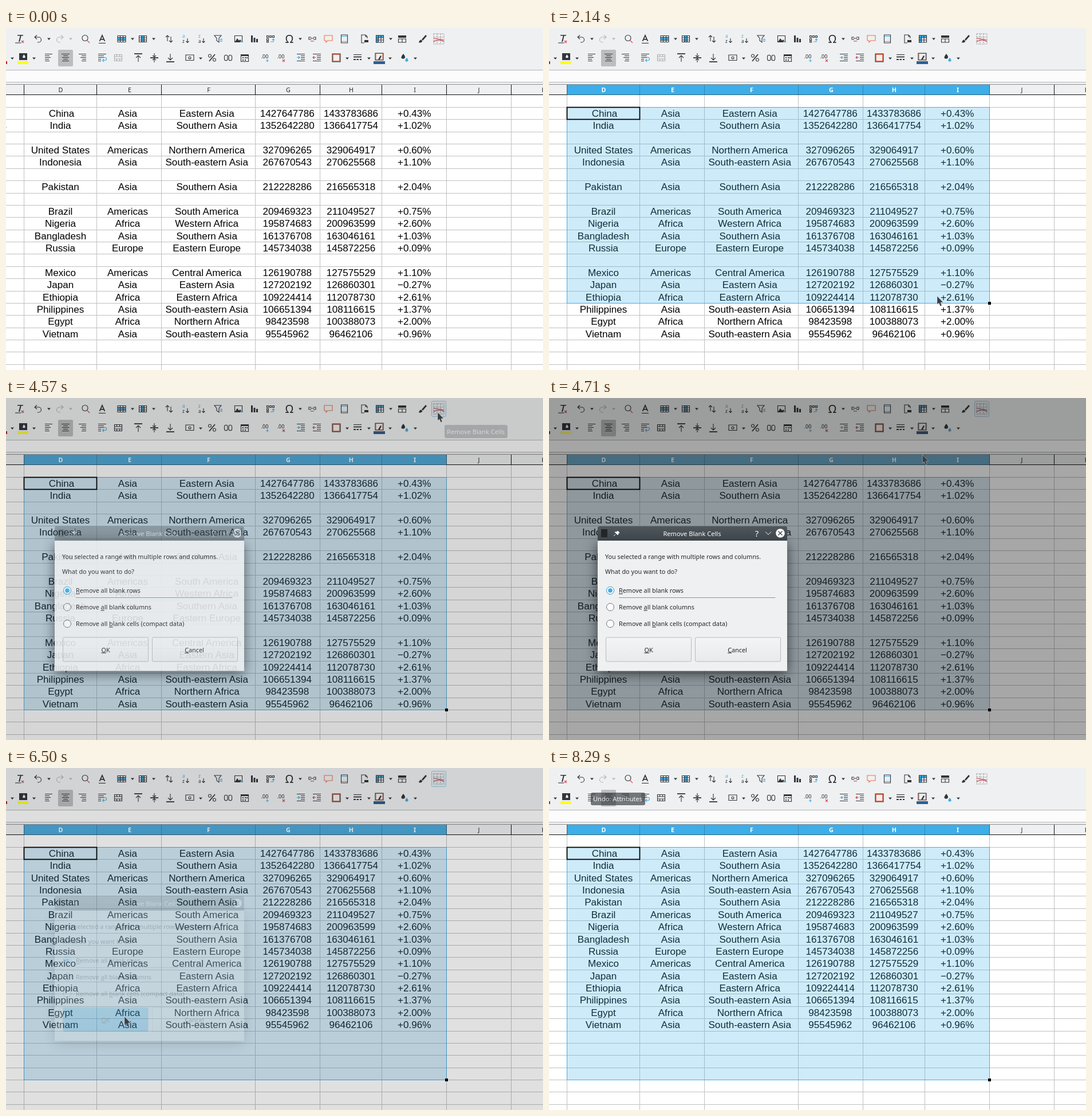
Write an HTML page that moves like this. It is 938 px wide and 597 px high and loops after 8.37 s.

```html
<!DOCTYPE html>
<html lang="en">
<head>
<meta charset="utf-8">
<title>Remove blank rows</title>
<style>
  html, body { margin: 0; width: 100%; height: 100%; overflow: hidden; background: #fff; }
  svg { display: block; }
  text { font-family: "Noto Sans", sans-serif; font-size: 10.8px; fill: #232629; white-space: pre; }
  .cell { font-family: "Liberation Sans", Arial, sans-serif; font-size: 17.1px; fill: #000; text-anchor: middle; }
  .mid { text-anchor: middle; }
  .on { font-weight: bold; fill: #fff; }
  .tip text { font-size: 11.1px; fill: #fcfcfc; }
  .tip rect { fill: #31363b; }
  .icons path { fill: none; stroke: #31363b; stroke-width: 1.1; }
  .icons .f { fill: #31363b; stroke: none; }
  .icons .b { stroke: #3daee9; }
  .icons .B { fill: #3daee9; stroke: none; }
  .icons .r { stroke: #da4453; }
  .icons .o { stroke: #f2704d; }
  .icons .g { stroke: #b4b6b8; }
  .icons .G { fill: #b4b6b8; stroke: none; }
  .icons .d { stroke: #85888a; stroke-dasharray: 2 1.5; stroke-width: .9; }
  .icons .w { stroke-width: 1.8; }
  #body { filter: drop-shadow(0 5px 11px rgba(0, 0, 0, .6)); }
  u, .u { text-decoration: underline; }
</style>
</head>
<body>
<script>
const LOOP = 8370, TICK = 500 / 7;
const colX = [31.5, 158.5, 271.5, 435.5, 548.5, 656.5, 769.5, 882.5];
const rowY = k => Math.round(138 + 21.37 * k) + .5;
const path = (d, cls = '') => `<path class="${cls}" d="${d}"/>`;
const rect = (x, y, w, h, attrs = '') => `<rect x="${x}" y="${y}" width="${w}" height="${h}" ${attrs}/>`;
const text = (x, y, s, cls = '', attrs = '') => `<text x="${x}" y="${y}" class="${cls}" ${attrs}>${s}</text>`;
const lines = (d, color) => `<path d="${d}" fill="none" stroke="${color}"/>`;

const people = `China|Asia|Eastern Asia|1427647786|1433783686|+0.43%
India|Asia|Southern Asia|1352642280|1366417754|+1.02%
United States|Americas|Northern America|327096265|329064917|+0.60%
Indonesia|Asia|South-eastern Asia|267670543|270625568|+1.10%
Pakistan|Asia|Southern Asia|212228286|216565318|+2.04%
Brazil|Americas|South America|209469323|211049527|+0.75%
Nigeria|Africa|Western Africa|195874683|200963599|+2.60%
Bangladesh|Asia|Southern Asia|161376708|163046161|+1.03%
Russia|Europe|Eastern Europe|145734038|145872256|+0.09%
Mexico|Americas|Central America|126190788|127575529|+1.10%
Japan|Asia|Eastern Asia|127202192|126860301|−0.27%
Ethiopia|Africa|Eastern Africa|109224414|112078730|+2.61%
Philippines|Asia|South-eastern Asia|106651394|108116615|+1.37%
Egypt|Africa|Northern Africa|98423598|100388073|+2.00%
Vietnam|Asia|South-eastern Asia|95545962|96462106|+0.96%`.split('\n').map(r => r.split('|'));
const blankBefore = [2, 4, 5, 9];
const slot = i => i + blankBefore.filter(b => b <= i).length;
const textX = [95, 212.5, 350.7, 491.3, 602.5, 713.3];
const headX = [95.5, 216, 354, 493, 603, 714, 826, 939];

// Each line: centre x, y, then "class:path" parts drawn around that centre.
const iconSpec = `24 19|f:M-4 -7H6V-5.5H2.7L0 5H-2L.7 -5.5H-4Z|:M-8 7H2|r:M3 3l4 4M7 3l-4 4
56 19|:M-2 -6.5l-4 3.5l4 3.5M-6 -3H1a4.2 4.2 0 0 1 0 9H-1
94 19|g:M2 -6.5l4 3.5l-4 3.5M6 -3H-1a4.2 4.2 0 0 0 0 9H1
139 19|:M-6 -1.5a5 5 0 1 0 10 0a5 5 0 1 0 -10 0|r:M2.5 2.5L7 7
168 19|w:M-4.5 4L0 -6L4.5 4M-3 .8H3|:M-6 7.5H6
202 19|B:M-7 -2.5h14v5h-14Z|:M-7 -5.5H7V5.5H-7ZM-2.5 -5.5V5.5M2.5 -5.5V5.5M-7 -2.5H7M-7 2.5H7
239 19|B:M-2.5 -6h5v12h-5Z|:M-6.5 -5.5H6.5V5.5H-6.5ZM-2.5 -5.5V5.5M2.5 -5.5V5.5M-6.5 -2H6.5M-6.5 2H6.5
285 19|:M-3 4V-6m-3 3l3 -3l3 3M3 -4V6m-3 -3l3 3l3 -3
314 19|:M3 -1V6.500m-2.500 -2.500l2.500 2.500l2.500 -2.500
342 19|:M3 -1V6.500m-2.500 -2.500l2.500 2.500l2.500 -2.500
371 19|:M-7 -6H5L1 -1V6L-3 3V-1Z|B:M3 0h4v1.500h-4ZM3 3h4v1.500h-4Z
406 19|:M-6.500 -5.500H6.500V5.500H-6.500Z|f:M-6 5l4 -6l3 4l2 -2l3 4Z|B:M3 4h5v2h-5Z
434 19|f:M-6 -6h3v12h-3ZM-1.500 -2h3v8h-3ZM3 0h3v6h-3Z
462 19|:M-6.500 -5.500h3v3h-3ZM-1.500 -5.500h3v3h-3ZM3.500 -5.500h3v3h-3ZM-6.500 -.500h3v3h-3ZM-6.500 4h3v2h-3Z|b:M0 5H5V0m-2 2l2 -2l2 2
535 19|:M-2 -3H-6V1H-2M2 -3H6V1H2M-3 -1H3|r:M-3 4l6 0
563 19|o:M-7 -6H7V3H-1L-4 6V3H-7Z
591 19|:M-5.500 -7H5.500V7H-5.500Z|b:M-5 -4.500H5M-5 4.500H5
626 19|:M0 7H-5V-7H2L5 -4V-1M2 -7V-4H5|f:M0 2h7v4h-7Z
653 19|B:M-7 -6.500h14v4h-14ZM-7 -2h4v9h-4Z|:M-6.500 -6H6.500V6H-6.500ZM-2.500 -6V6M2 -6V6M-6.500 -2H6.500M-6.500 2H6.500
692 19|f:M-7 -6h14v4h-14Z|:M-6.500 0H6.500V6H-6.500ZM0 0V6
727 19|f:M6 -7L8 -5L1 3L-1 1ZM-2 1.500L.500 4Q-1 7 -6 6.500Q-5 2 -2 1.500Z
756 19|d:M-9 -9H9V9H-9ZM-9 -3H9M-9 3H9M-3 -9V9M3 -9V9|r:M-9 5Q0 -1 9 5M-9 -1L9 2
30 52|f:M-7 -8h14v12h-14Z
75 52|:M-7 -6.500H6M-7 -3.500H1M-7 -.500H3M-7 2.500H0M-7 5.500H1
104 52|:M-7 -6.500H7M-4 -3.500H4M-6 -.500H6M-4 2.500H4M-6 5.500H6
133 52|:M-6 -6.500H7M-1 -3.500H7M-3 -.500H7M0 2.500H7M-1 5.500H7
168 52|:M-7 -6.500H7M-7 -3.500H3M-7 -.500H3M-7 2.500H-2M-7 5.500H-2|b:M3 -.500H5a2.500 2.500 0 0 1 0 5H1m2 -2.500l-2.500 2.500l2.500 2.500
231 52|w:M-7 -7H7|:M0 7V-4m-4 4l4 -4l4 4
259 52|w:M-7 0H7|:M0 -8V-2m-3 -2l3 2.500l3 -2.500M0 8V2m-3 2l3 -2.500l3 2.500
287 52|w:M-7 7H7|:M0 -7V4m-4 -4l4 4l4 -4
321 52|:M-7 -5H7V4.500H-7ZM-2 0a2 2 0 1 0 4 0a2 2 0 1 0 -4 0
360 52|w:M5 -6L-5 6|:M-6.500 -3.500a2.500 2.500 0 1 0 5 0a2.500 2.500 0 1 0 -5 0M1.500 3.500a2.500 2.500 0 1 0 5 0a2.500 2.500 0 1 0 -5 0
388 52|:M-6.500 -2a2.800 2.800 0 0 1 5.600 0V2a2.800 2.800 0 0 1 -5.600 0ZM1 -2a2.800 2.800 0 0 1 5.600 0V2a2.800 2.800 0 0 1 -5.600 0Z
417 52|:M-6.500 -5.500H6.500V6.500H-6.500Z|f:M-6 -6H6V-3H-6ZM-4 -1h2v2h-2ZM0 -1h2v2h-2ZM3 -1h2v2h-2ZM-4 3h2v2h-2ZM0 3h2v2h-2Z
452 52|b:M2 5H7M4.500 2.500V7.500
480 52|r:M3 3l4 4M7 3l-4 4
515 52|:M-7 -6.500H7M0 -3.500H7M0 -.500H7M0 2.500H7M-7 5.500H7|b:M-7 -.500H-2m-2.500 -2.500l2.500 2.500l-2.500 2.500
543 52|:M-7 -6.500H7M0 -3.500H7M0 -.500H7M0 2.500H7M-7 5.500H7|r:M-2 -.500H-7m2.500 -2.500l-2.500 2.500l2.500 2.500
577 52|o w:M-6 -6H6V6H-6Z|:M-7 -7H7V7H-7Z
614 52|:M-7 -5.500H7|w:M-7 -1.500H7|w:M-7 3H-3M-1.500 3H2M4 3H7
652 52|o:M-6 -7.500H6V3.500H-6Z|f:M-2 3l4 -7l2 1l-3 6Z|:M-7 -8H7V4H-7Z
697 52|f:M-3 -7Q2 -1 -1 1Q-3 2.500 -6 1Q-8 -1 -3 -7Z|B:M3 0Q7 4 5 6Q3 7.500 1 6Q-1 4 3 0Z`;
const drops = [[75, 19], [221, 19], [258, 19], [514, 19], [672, 19], [11, 53], [49, 53],
  [340, 53], [596, 53], [634, 53], [671, 53], [715, 53]];
const at = (x, y, inner, extra = '') => `<g transform="translate(${x} ${y})" ${extra}>${inner}</g>`;

function toolbar() {
  const icons = iconSpec.split('\n').map(line => {
    const [pos, ...parts] = line.split('|'), [x, y] = pos.split(' ');
    return at(x, y, parts.map(p => { const [c, d] = p.split(':'); return path(d, c); }).join(''));
  }).join('');
  const arrow = 'M-3 -1.5H3L0 2Z', merge = 'M-6.5 -5.5H6.5V5.5H-6.5ZM-6.5 -2H6.5M-6.5 2H6.5M-2.5 -5.5V-2M2.5 -5.5V-2M-2.5 2V5.5M2.5 2V5.5';
  const az = (x, a, b) => text(x - 6, 17, a, '', 'style="font-size:8px;fill:#3daee9"') + text(x - 6, 26, b, '', 'style="font-size:8px"');
  return rect(0, 0, 938, 98, 'fill="#eff0f1"') + rect(91, 38, 26, 29, 'rx="2" fill="#bbbdbe"') +
    '<g class="icons">' + icons + drops.map(([x, y]) => at(x, y, path(arrow, 'f'))).join('') +
    at(113, 19, path(arrow, 'G')) + at(196, 52, path(merge), 'id="merge"') + '</g>' +
    az(314, 'a', 'z') + az(342, 'z', 'a') +
    text(495, 26, 'Ω', 'mid', 'style="font-size:19px"') +
    text(452, 53, '.00', 'mid', 'style="font-size:9px"') + text(480, 53, '.00', 'mid', 'style="font-size:9px"') +
    '<path d="M31 46q4 4 2 6q-3 1 -4 -1z" fill="#eff0f1"/>' +
    rect(20, 58, 19, 5, 'fill="#ff0"') + rect(642, 58, 20, 5, 'fill="#2a6099"') + rect(0, 58, 2, 5, 'fill="#c9211e"') +
    rect(743.5, 5.5, 25, 27, 'id="hover" rx="2" fill="#3daee9" fill-opacity=".06" stroke="#8ccbec"') +
    rect(0, 74, 938, 20, 'fill="#fcfcfc"') + lines('M0 73.5H938M0 94.5H938', '#b3b5b6');
}

function sheet() {
  let grid = '', seps = 'M0 116.5H938';
  for (const x of colX) { grid += `M${x} 117V597`; seps += `M${x} 99V116`; }
  for (let k = 0; k < 22; k++) grid += `M0 ${rowY(k)}H938`;
  const heads = headX.map((x, i) => {
    const w = (colX[i + 1] || 938) - colX[i];
    return (i < 6 ? rect(colX[i], 99, w, 17.5, 'class="lit" fill="#3daee9"') : '') + text(x, 112, 'DEFGHIJK'[i], 'mid head');
  }).join('');
  const rows = people.map((r, i) => '<g class="row">' +
    r.map((s, c) => text(textX[c] + (i + c ? 0 : 2), 155, s, 'cell')).join('') + '</g>').join('');
  return rect(0, 98, 938, 18, 'fill="#eff0f1"') + lines('M0 98.5H938', '#8d8f90') + lines(seps, '#111') + heads +
    lines(grid, '#c0c0c0') + rows +
    rect(31.5, 138.5, 1, 1, 'id="range" fill="#3daee9" fill-opacity=".25" stroke="#3daee9"') +
    rect(31.5, 138.5, 127, 21, 'id="active" fill="none" stroke="#000" stroke-width="1.8"') +
    rect(0, 0, 5, 5, 'id="handle"');
}

function dialog() {
  const u = s => s.replace(/_(.)/, '<tspan class="u">$1</tspan>');
  const radio = (y, s) => `<circle cx="107" cy="${y}" r="6.5" fill="#fcfcfc" stroke="#6f7376"/>` + text(122, y + 4.3, u(s));
  const button = (x, id) => rect(x, 418, 149, 42, `id="${id}" rx="2" fill="url(#btn)" stroke="#b9bbbd"`);
  return rect(85, 249, 331, 227.5, 'id="body" fill="#eff0f1"') +
    '<g id="bar"><path d="M85 249V227q0 -3 3 -3H413q3 0 3 3V249Z" fill="url(#title)"/>' +
    rect(91, 229, 11, 14, 'fill="#232629"') +
    '<path d="M113 241l3 -3M115 234l5 5l1 -2l2 -2l-3 -3l-2 2z" fill="#fcfcfc" stroke="#fcfcfc"/>' +
    text(250, 240.5, 'Remove Blank Cells', 'mid', 'style="font-size:11.1px;fill:#fcfcfc"') +
    text(363, 241.5, '?', 'mid', 'style="font-size:15px;fill:#fcfcfc"') +
    lines('M378 233.5l5 5l5 -5', '#fcfcfc') + '<circle cx="404" cy="236" r="7.8" fill="#fcfcfc"/>' +
    '<path d="M400.500 232.500l7 7m0 -7l-7 7" stroke="#3b4248" stroke-width="1.3"/></g>' +
    text(98, 280.5, 'You selected a range with multiple rows and columns.') +
    text(98, 307, 'What do you want to do?') +
    radio(336, '_Remove all blank rows') + radio(365, 'Remove _all blank columns') +
    radio(394, 'Remove all _blank cells (compact data)') +
    '<circle cx="107" cy="336" r="6.5" fill="#fcfcfc" stroke="#3daee9"/><circle cx="107" cy="336" r="3.8" fill="#3daee9"/>' +
    lines('M122 348.5H395.500', '#3daee9') + button(99.5, 'ok') + button(255.5, 'cancel') +
    text(174, 443.5, u('_OK'), 'mid') + text(329, 443.5, u('_Cancel'), 'mid');
}
const tip = (id, x, y, w, h, s) => `<g class="tip" id="${id}">` + rect(x, y, w, h, 'rx="3"') + text(x + 4, y + h / 2 + 4, s) + '</g>';
const fade = (id, a, b) => `<linearGradient id="${id}" x2="0" y2="1"><stop stop-color="${a}"/><stop offset="1" stop-color="${b}"/></linearGradient>`;

document.body.innerHTML = '<svg width="938" height="597" viewBox="0 0 938 597"><defs>' +
  fade('title', '#50585e', '#3c444a') + fade('btn', '#f3f4f4', '#e9eaeb') + fade('press', '#52b8ec', '#35a6e1') + '</defs>' +
  '<g id="desk">' + rect(0, 0, 938, 597, 'fill="#fff"') + sheet() + toolbar() + '</g>' +
  `<g id="dialog">${dialog()}</g>` +
  tip('tipRemove', 766, 47, 110, 23, 'Remove Blank Cells') + tip('tipUndo', 73, 43, 95, 22, 'Undo: Attributes') +
  '<path id="cursor" d="M0 0V14.500L3 12L5.500 17.500L8 16.500L6 11H10.500Z" fill="#3a3d40" stroke="#fff" stroke-opacity=".45" stroke-width=".8"/></svg>';

const $ = id => document.getElementById(id);
const lit = [...document.querySelectorAll('.lit')], heads = [...document.querySelectorAll('.head')];
const rowEls = [...document.querySelectorAll('.row')];
const clamp = v => Math.min(1, Math.max(0, v));
const ramp = (t, a, b) => clamp((t - a) / (b - a));
const show = (el, on) => el.setAttribute('visibility', on ? 'visible' : 'hidden');
const alpha = (id, v) => { $(id).style.opacity = v; show($(id), v > 0); };

// Pointer stops: time, x, y, ease-out power of the way there.
const route = [[0, -9, 163], [70, -9, 163], [360, 90, 145], [715, 90, 145], [1000, 107, 157], [1140, 107, 157],
  [1290, 107, 144], [1430, 107, 144], [1710, 457, 288, 1], [2130, 457, 288], [2140, 678, 468], [2215, 678, 468],
  [2640, 708, 524, 1], [3140, 708, 524], [3290, 706, 529], [3420, 706, 529], [3430, 709, 526], [3570, 709, 526],
  [3640, 719, 384], [3710, 732, 240], [4070, 754, 25], [4600, 754, 25], [5290, 283, 369, 1.4], [5790, 207, 434],
  [7360, 207, 434], [8000, 62, 20, 1.5], [LOOP, 62, 20]];
// Selection: time, columns, rows.
const picks = [[0, 0, 0], [930, 1, 1], [1500, 1, 2], [1570, 2, 3], [1640, 3, 5], [1710, 3, 7],
  [2140, 6, 16], [2360, 6, 17], [2570, 6, 18], [3210, 6, 19]];

function pointer(t) {
  const i = Math.max(1, route.findIndex(k => k[0] >= t));
  const [t0, x0, y0] = route[i - 1], [t1, x1, y1, pow = 2] = route[i];
  const e = 1 - Math.pow(1 - ramp(t, t0, t1), pow);
  return [x0 + (x1 - x0) * e, y0 + (y1 - y0) * e];
}

function draw(t) {
  const [, cols, rows] = picks.filter(p => p[0] <= t).pop();
  const right = colX[cols], bottom = rowY(rows);
  lit.forEach((el, i) => show(el, i < cols));
  heads.forEach((el, i) => el.classList.toggle('on', i < cols));
  show($('active'), cols); show($('handle'), cols); show($('range'), rows > 1);
  if (cols) {
    $('range').setAttribute('width', right - 31.5);
    $('range').setAttribute('height', bottom - 138.5);
    $('handle').setAttribute('x', right - 2.5);
    $('handle').setAttribute('y', bottom - 2.5);
  }
  rowEls.forEach((el, i) => el.setAttribute('transform', `translate(0 ${21.37 * (t < 6290 ? slot(i) : i)})`));
  $('merge').style.opacity = t < 2790 ? .35 : 1;
  show($('hover'), t >= 4000 && t < 7430);

  const closing = t >= 6500;
  const dim = closing ? (t < 6710 ? .3 : t < 6790 ? .08 : 0) : ramp(t, 4450, 4750);
  $('desk').style.filter = dim ? `brightness(${1 - .4 * dim}) saturate(${1 - .55 * dim})` : 'none';
  alpha('dialog', closing ? (t < 6710 ? .2 : t < 6790 ? .04 : 0) : ramp(t, 4440, 4590));
  $('bar').style.opacity = closing ? .8 : ramp(t, 4490, 4670);

  const [x, y] = pointer(t), over = t > 5000 && x < 248 && y > 414;
  $('ok').setAttribute('fill', t >= 6210 ? 'url(#press)' : 'url(#btn)');
  $('ok').setAttribute('stroke', over ? '#9fbfc4' : '#b9bbbd');
  alpha('tipRemove', ramp(t, 4210, 4430) * (1 - ramp(t, 4440, 4610)));
  alpha('tipUndo', ramp(t, 8140, 8370));
  $('cursor').setAttribute('transform', `translate(${x.toFixed(1)} ${y.toFixed(1)})`);
  show($('cursor'), t < 8070);
}

let last = -1;
function frame() {
  const n = Math.floor((performance.now() % LOOP + 5) / TICK);
  if (n !== last) draw(Math.round(n * TICK / 10) * 10);
  last = n;
  requestAnimationFrame(frame);
}
frame();
</script>
</body>
</html>
```
